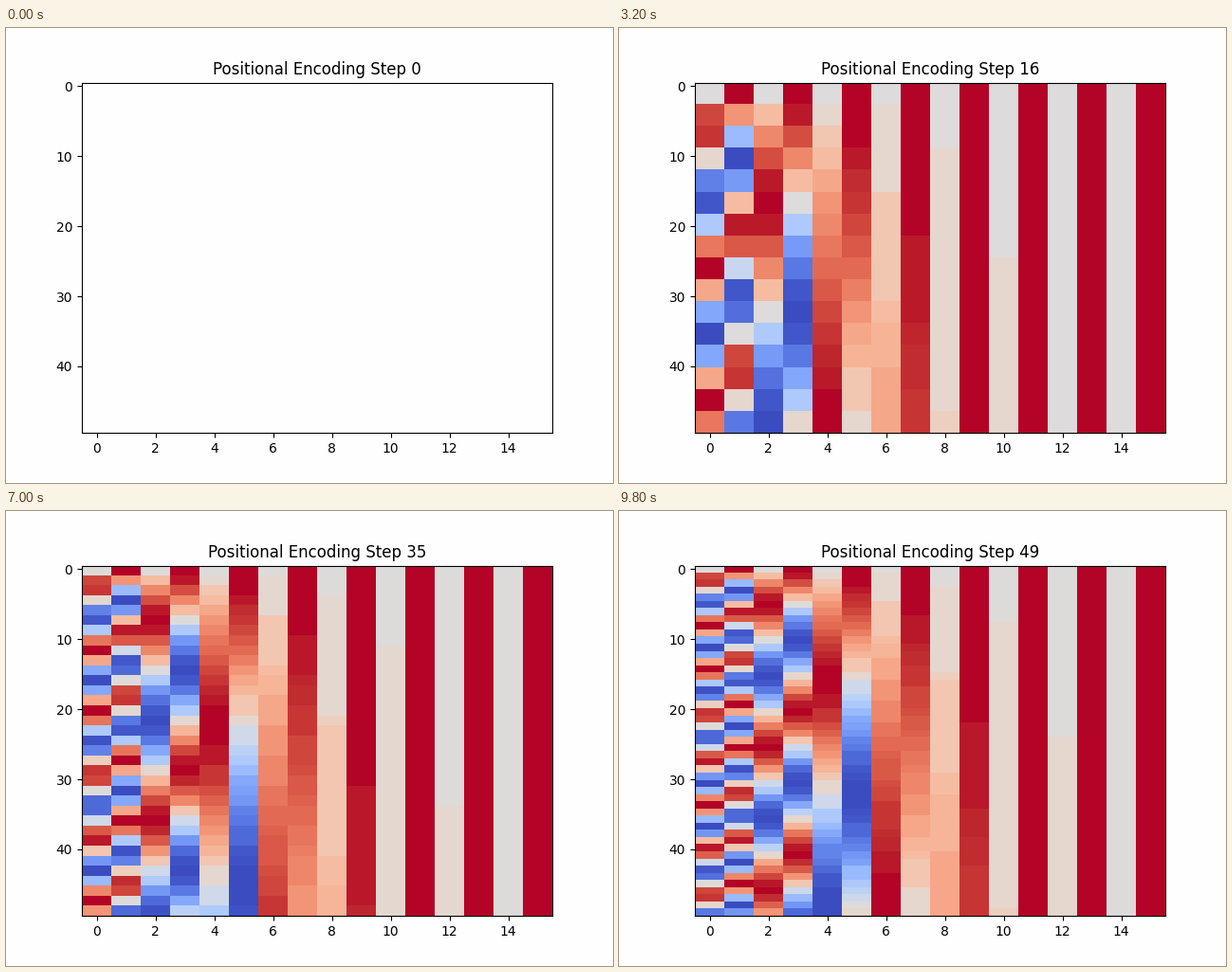
Animation of 640x480 px, one loop 10000 ms. Source, as a matplotlib script:

```python
import numpy as np
import matplotlib.pyplot as plt
from matplotlib.animation import FuncAnimation

POSITIONS, DIM = 50, 16
PAPER = "#fefefe"


def positional_encoding(positions, dim):
    pos = np.arange(positions)[:, None]
    angle = pos / 10000 ** (np.arange(0, dim, 2) / dim)
    pe = np.zeros((positions, dim))
    pe[:, 0::2] = np.sin(angle)
    pe[:, 1::2] = np.cos(angle)
    return pe


def posterize(rgb):
    """Group colours into 3-4-3 bit bins and paint each bin in its mean."""
    flat = rgb.reshape(-1, 3).astype(int)
    r, g, b = flat.T
    bins = (r >> 5) << 7 | (g >> 4) << 3 | b >> 5
    _, group = np.unique(bins, return_inverse=True)
    group = group.ravel()
    count = np.bincount(group)
    means = [np.bincount(group, weights=c) / count for c in flat.T]
    return np.stack(means, axis=1)[group].astype(np.uint8).reshape(rgb.shape)


pe = positional_encoding(POSITIONS, DIM)
norm = plt.Normalize(pe.min(), pe.max())
colors = plt.get_cmap("coolwarm")(norm(pe), bytes=True)[..., :3]

fig, ax = plt.subplots(figsize=(6.4, 4.8), dpi=100, facecolor=PAPER)
ax.set_facecolor(PAPER)
image = ax.imshow(colors, aspect="auto")
title = ax.set_title("")


def update(step):
    image.set_visible(step > 0)
    if step:
        image.set_data(posterize(colors[:step]))
    title.set_text(f"Positional Encoding Step {step}")
    return image, title


anim = FuncAnimation(fig, update, frames=POSITIONS, interval=200,
                     init_func=lambda: update(0), repeat=True, repeat_delay=0)
plt.show()
```
